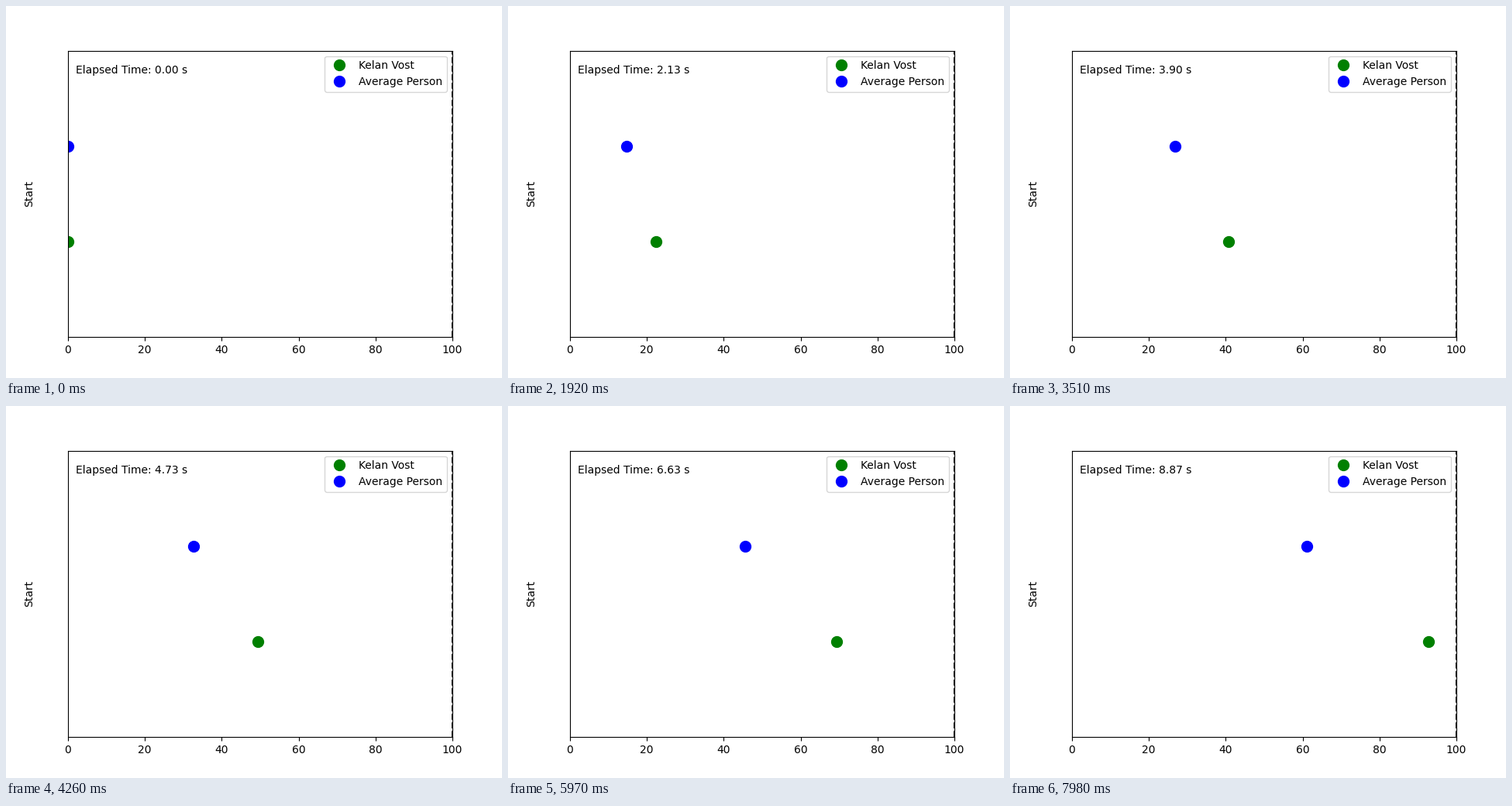
Recreate the animation shown at these times as a matplotlib script. Size 640 by 480 pixels, loop 8 s.

```python
import matplotlib.pyplot as plt
from matplotlib.animation import FuncAnimation

LOOP_MS = 8000
INTERVAL = 20
FPS = 30
DISTANCE = 100
FAST_STEPS = int(9.58 * FPS)   # steps each runner needs for the full distance
SLOW_STEPS = int(14.55 * FPS)

fig, ax = plt.subplots(figsize=(6.4, 4.8), dpi=100)
ax.set_xlim(0, DISTANCE)
ax.set_ylim(0, 3)
ax.set_yticks([])
ax.axvline(DISTANCE, color="black", linestyle="--")
ax.text(-10, 1.5, "Start", rotation=90, ha="center", va="center")
clock = ax.text(0.02, 0.95, "", transform=ax.transAxes, va="top")


def add_runner(color, lane, label):
    dot, = ax.plot([0], [lane], "o", color=color, markersize=10, label=label)
    return dot


fast = add_runner("green", 1, "Kelan Vost")
slow = add_runner("blue", 2, "Average Person")
ax.legend(loc="upper right")


def update(frame):
    # The race advances one step every 30 ms, so two steps per three frames.
    step = (2 * frame + 1) // 3
    fast.set_xdata([DISTANCE * step / FAST_STEPS])
    slow.set_xdata([DISTANCE * step / SLOW_STEPS])
    clock.set_text(f"Elapsed Time: {step / FPS:.2f} s")
    return fast, slow, clock


anim = FuncAnimation(fig, update, frames=LOOP_MS // INTERVAL,
                     interval=INTERVAL, repeat=True, repeat_delay=0)
plt.show()
```
